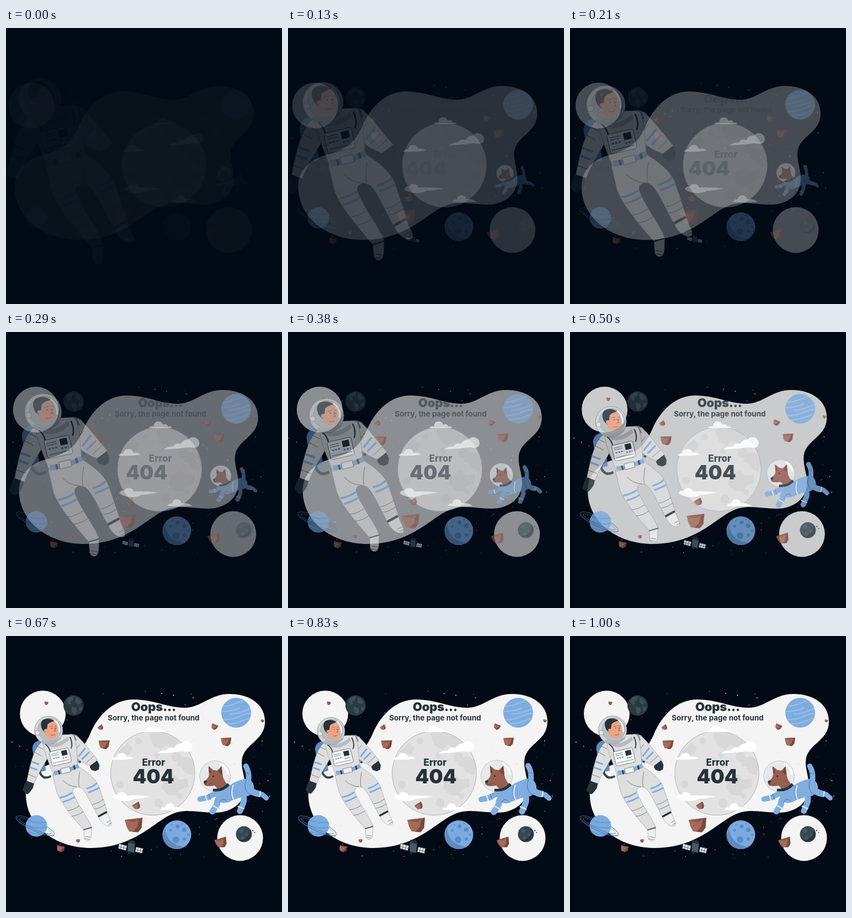
An HTML page that plays this animation: 500 px wide and 500 px high, repeating every 1.04 s.

```html
<!DOCTYPE html>
<html lang="en">
<head>
<meta charset="utf-8">
<title>Page not found</title>
<style>
  html, body { margin: 0; width: 100%; height: 100%; overflow: hidden; background: #020a15; }
  svg { display: block; width: 100%; height: 100%; --d: .53; --o: .03; }
  /* --d is the remaining travel, --o the shared opacity */
  .layer { opacity: var(--o); }
  .right { transform: translateX(calc(var(--d) * -40px)); }
  .left { transform: translateX(calc(var(--d) * 40px)); }
  .shrink { transform: scale(calc(1 + var(--d))); transform-origin: 110px 255px; }
  .grow { transform: scale(calc(1 - var(--d))); }
  .dog { transform-origin: 411px 275px; }
  .sat { transform-origin: 226px 382px; }
  text { font-family: Inter, "Open Sans", sans-serif; fill: #263238; text-anchor: middle; }
  .line { fill: none; stroke: #37474f; stroke-width: .6; stroke-linecap: round; }
  .suit { fill: #dedede; stroke: #78838a; stroke-width: .5; }
  .blue { fill: #7fade0; }
  .band { fill: none; stroke: #7fade0; stroke-width: 3; }
  .dark { fill: #263238; }
  .fur { fill: #985e50; }
  .limb { fill: none; stroke: #7fade0; stroke-linecap: round; stroke-linejoin: round; }
</style>
</head>
<body>
<svg viewBox="0 0 500 500">
  <defs>
    <clipPath id="moonClip"><circle cx="265" cy="248.500" r="76.500"/></clipPath>
    <clipPath id="blueClip"><circle cx="309.500" cy="360" r="26"/></clipPath>
    <clipPath id="bandClip"><circle cx="417" cy="139" r="27"/></clipPath>
    <clipPath id="ringClip"><circle cx="55" cy="344" r="19.500"/></clipPath>
    <g id="rock">
      <path fill="#a56a5b" d="M-1-.55 1-.8 .9 .35 .5 .85-.5 .75-.8 .2Z"/>
      <path fill="#794a3f" d="M1-.8 .9 .35 .5 .85-.1 .8 .4 .25 .6-.6Z"/>
      <path fill="#8a5649" d="M-1-.55 1-.8 .6-.6 .1-.3-.4-.4Z"/>
    </g>
  </defs>

  <g class="layer right" fill="#f4f4f4">
    <path d="M37 292C35 258 58 238 88 230C125 220 140 207 153 178C168 142 196 115 232 115C268 115 294 130 324 130C355 130 370 105 406 105C440 105 470 122 470 155C470 192 428 195 428 229C428 246 435 258 434 276C432 308 402 320 380 320C352 320 335 314 312 319C274 328 240 384 155 384C90 384 40 345 37 292Z"/>
    <circle cx="67.500" cy="140.500" r="41.500"/>
    <circle cx="425" cy="366" r="41.500"/>
  </g>
  <g id="stars" class="layer right" fill="#d9dde0"></g>

  <g class="layer">
    <circle cx="122.500" cy="126" r="18.500" fill="#2b3941"/>
    <path fill="#3f4e57" d="M109 117c4-6 9-8 14-8l-1 6-6 3 2 5-5 2zM126 112c5 0 9 4 11 9l-6 3-5-4zM119 128l8 2 2 6-5 7-4-5zM133 128l6 1-3 7-4-2z"/>
    <circle cx="431" cy="359" r="14.500" fill="#37474f"/>
    <g fill="#46565f"><circle cx="426" cy="353" r="4"/><circle cx="437" cy="360" r="3"/><circle cx="429" cy="366" r="3.500"/></g>
    <path fill="#263238" d="M441 349a14.500 14.500 0 0 1-19 21c12 0 21-9 19-21z"/>
    <g fill="#37474f"><circle cx="447" cy="352.500" r="1.200"/><circle cx="450.500" cy="356" r="1"/></g>

    <circle cx="417" cy="139" r="27" fill="#7eacdf"/>
    <g clip-path="url(#bandClip)" fill="none" stroke="#98beea" stroke-width="2.200" transform="rotate(-8 417 139)">
      <path d="M390 124q18 2 34-3t24 0M387 133q22 3 38-2M404 140q20 2 42-6M389 148q20 3 35-2t24 0M398 157q18 2 40-5"/>
    </g>

    <g transform="rotate(25 53 344)" fill="none" stroke="#557fae">
      <ellipse cx="53" cy="344" rx="38" ry="9" stroke-width=".9"/>
      <ellipse cx="53" cy="344" rx="32" ry="6" stroke-width=".6"/>
    </g>
    <circle cx="55" cy="344" r="19.500" fill="#7aabe0"/>
    <g clip-path="url(#ringClip)" fill="none" stroke="#6a9bd3" stroke-width="2.500">
      <path d="M36 332q16 9 38 5M34 341q20 10 42 5M38 354q16 8 34 3"/>
    </g>
    <g transform="rotate(25 53 344)" fill="none">
      <path d="M15 344a38 9 0 0 0 76 0" stroke="#46719f" stroke-width="1"/>
      <path d="M21 344a32 6 0 0 0 64 0" stroke="#46719f" stroke-width=".7"/>
    </g>

    <circle cx="309.500" cy="360" r="26" fill="#7baae0"/>
    <g clip-path="url(#blueClip)" fill="#5e8cc0">
      <path d="M290 339c-6 20 8 43 38 43l-16 10-32-14z"/>
      <circle cx="308" cy="369" r="6"/><circle cx="323" cy="351" r="4"/><circle cx="311" cy="345" r="3.500"/>
      <circle cx="323" cy="368" r="3"/><circle cx="298" cy="352" r="2.500"/><circle cx="319" cy="340" r="1.500"/>
      <circle cx="330" cy="360" r="2"/><circle cx="301" cy="342" r="1.500"/>
    </g>
  </g>

  <g class="layer left">
    <circle cx="265" cy="248.500" r="76.500" fill="#e2e2e2"/>
    <g clip-path="url(#moonClip)" fill="#d8d8d8">
      <path d="M258 176c18-6 45 3 57 18l-12 8-14-5-9 9-14-7-5-12zM314 222c10-8 22-1 28 9l-5 22-14-6-5-9-10-3zM285 261l17-10 11 9 15-2 1 15-16 6-3 10-17-1-12-12zM202 209l18-15 9 8-5 12-16 7z"/>
      <circle cx="308" cy="219" r="9"/><circle cx="272" cy="216" r="5"/><circle cx="239" cy="190" r="6"/>
      <circle cx="206" cy="269" r="7"/><circle cx="314" cy="290" r="5"/><circle cx="276" cy="303" r="8"/>
    </g>
    <circle cx="265" cy="248.500" r="76.200" fill="none" stroke="#8b9195" stroke-width=".6"/>
  </g>
  <g class="layer left" fill="#fff">
    <path d="M245 174q3-4 9-3q1-9 8-9q7-1 9 6q7-3 9 3q6-1 7 3z"/>
    <path d="M272 213q8-6 18-6q5-7 13-4q5-9 14-8q4-6 12-4q8 3 8 11q-1 8-10 8q-10-2-18 0q-18 2-37 3z"/>
    <path d="M190 224q3-5 9-4q2-9 10-8q7 0 8 7q9-2 14 3q-18 3-41 2z"/>
    <path d="M192 292q4-7 9-4q3-7 10-5q6 1 7 6q23-1 45 2q-16 3-31 4q-9 5-22 4q-13-2-18-7z"/>
    <path d="M279 315q3-5 8-4q3-9 10-8q7 1 7 7q10-1 21 5q-20 2-46 0z"/>
  </g>

  <g class="layer left">
    <text x="266.500" y="136" font-size="22" font-weight="900" letter-spacing="-.2">Oops...</text>
    <text x="266.500" y="153" font-size="13.400" font-weight="700">Sorry, the page not found</text>
    <text x="266.500" y="235" font-size="17" font-weight="800">Error</text>
  </g>
  <g class="layer right">
    <text x="268" y="267" font-size="35.500" font-weight="900">404</text>
  </g>

  <g id="rocks" class="layer right"></g>

  <g class="layer"><g class="grow sat">
    <path class="line" stroke="#90a4ae" d="M205 380l41 9M229 372l2-6"/>
    <path fill="#455a64" d="M221 374l13 2-2 17-12-3z"/>
    <path fill="#263238" d="M222 369l11 2 1 6-13-3zM219 390l8 2-4 4z"/>
    <g fill="#f1f3f4" stroke="#37474f" stroke-width=".8">
      <path d="M204 376l15 4-2 9-14-4zM236 382l13 3-2 9-13-3z"/>
      <path fill="none" d="M209 377l-2 10M214 379l-2 9M203 381l15 4M240 383l-2 9M245 384l-2 9M235 387l13 3"/>
    </g>
  </g></g>

  <g class="layer"><g class="grow dog">
    <g class="limb">
      <path stroke-width="10" d="M439 268Q443 248 435 235"/>
      <path stroke-width="12" d="M438 274Q448 285 458 286"/>
      <path stroke-width="9" d="M455 287L465 287 473 294"/>
      <path stroke-width="11" d="M428 282Q434 295 430 304L424 318"/>
      <path stroke-width="10" d="M395 285Q376 284 365 293L350 296"/>
      <path stroke-width="11" d="M394 288Q380 295 382 305L373 319"/>
    </g>
    <path class="blue" d="M380 280Q390 270 406 270Q421 260 437 258Q452 262 450 280Q444 292 428 292Q413 296 402 302Q388 306 380 296Z"/>
    <path class="line" d="M408 272Q407 288 410 297M436 260Q428 276 442 288M386 302Q392 292 399 299M430 246l12 3M461 281l-2 10M420 309l11 4M366 287l4 10M374 308l12 5"/>
    <g fill="none" stroke="#d9e9fa" stroke-width="2.500">
      <path d="M412 270Q406 283 412 297M360 289l3 10M374 308l11 6M462 281l-2 11M420 309l12 5"/>
    </g>
    <circle cx="378" cy="253.500" r="28.500" fill="#e6e9eb" stroke="#a9b3b8" stroke-width=".7"/>
    <path class="fur" d="M367 249L366 235L375 242L382 243L390 235L392 252Q394 264 405 272L386 280L377 271Q369 273 360 271Q355 267 359 262Q367 257 367 249Z"/>
    <path fill="#71443b" d="M390 235L392 252L384 246ZM366 235L371 246L367 249Z"/>
    <path class="dark" d="M357 263q4-3 6 0l-2 4q-4 0-4-4zM373 253q2-2 3 0t-2 2z"/>
    <path class="line" d="M362 269q7 1 12-4"/>
    <path fill="none" stroke="#263238" stroke-width="5" d="M374 279Q393 281 403 268"/>
    <path fill="none" stroke="#fff" stroke-width="4" stroke-linecap="round" d="M389 231Q400 237 402 249"/>
  </g></g>

  <g class="layer"><g class="shrink">
    <path fill="#5d8dc3" d="M66 190Q50 191 49 205L55 239Q60 249 73 244ZM121 181q10-2 11 7l-3 10zM124 206l6-2 4 14-4 12z"/>
    <path fill="none" stroke="#37474f" stroke-width="4" d="M69 232Q57 246 67 254Q72 259 82 254"/>
    <path fill="none" stroke="#37474f" stroke-width="4" d="M128 209q9 2 7 17l-3 4"/>

    <path class="suit" d="M70 191C54 198 47 224 39 263L52 268C60 246 72 232 80 214Z"/>
    <path class="band" d="M47 228l14 5M44 238l14 5"/>
    <path class="line" d="M42 251l13 5M52 211l13 7M58 201l10 5"/>
    <path class="dark" d="M38 262l14 5-2 8-5 7-4 4-5-2-4-5 2-7z"/>

    <path class="suit" d="M113 180C129 176 137 192 165 225L153 236C139 232 127 223 116 211Z"/>
    <path fill="#80888d" d="M113 183l10-4 5 11-11 5z"/>
    <path class="band" d="M137 224l13-13M131 219l12-15"/>
    <path class="line" d="M145 230l13-12M124 209l9-11"/>
    <path class="dark" d="M152 235l12-9 4 8-1 8-6 3-7-2-3-5z"/>

    <path class="suit" d="M85 251L131 237C149 248 163 260 168 275L182 317L166 326C154 305 147 286 137 276C128 270 119 274 121 283C131 308 147 326 154 344L140 349C120 326 98 300 92 281Z"/>
    <path class="suit" style="fill:#efefef" d="M140 348L154 345C153 355 155 361 151 367C147 371 141 367 141 362ZM166 325L182 318C184 327 191 334 189 341C183 346 170 338 166 325Z"/>
    <path fill="none" stroke="#263238" stroke-width="3.500" stroke-linecap="round" d="M167 325l13-7"/>
    <path class="line" style="stroke-width:1.500" d="M140 349l14-4"/>
    <path class="band" d="M98 292Q110 290 120 283M103 300Q114 297 124 291M145 276Q157 273 164 266M148 283Q160 279 168 274"/>
    <path class="line" d="M112 315q10-1 20-8M119 325q11-1 20-8M156 304q9-1 19-9M160 312q9-1 18-8M104 262q9 10 24 11M133 247q-3 14-1 26M143 361l8 1M142 365l8 1M181 336l6-3M184 340l5-3"/>

    <path class="suit" d="M67 190C85 182 105 178 122 181C130 200 127 220 131 239L87 253C79 231 70 215 67 190Z"/>
    <path fill="#b7bbbe" d="M76 195Q93 200 112 184L114 190Q95 207 78 201Z"/>
    <path class="band" style="stroke-width:7" d="M87 248Q111 246 131 235"/>
    <path fill="#f0f0f0" stroke="#37474f" stroke-width=".6" d="M99 241l16-4 2 9-16 4z"/>
    <path fill="#37474f" d="M94 244l3-1 2 7-3 1zM121 236l3-2 2 7-3 2z"/>
    <path class="line" style="stroke-width:2" d="M72 197Q79 202 81 212M116 185Q121 196 118 204"/>
    <g transform="rotate(-13 98 219)">
      <rect x="81" y="207" width="35" height="26" rx="3" fill="#fafafa" stroke="#455a64" stroke-width=".7"/>
      <rect x="102" y="210" width="10" height="9" class="dark"/>
      <path fill="none" stroke="#5f8fc5" stroke-width="2" stroke-dasharray="3 1.500" d="M85 220h13M102 223h10"/>
      <path class="line" d="M84 212h13M84 215h13M84 228h29"/>
    </g>

    <circle cx="78" cy="172.500" r="25" fill="#d3d6d8" stroke="#78838a" stroke-width=".7"/>
    <circle cx="79.500" cy="171.500" r="20.500" fill="#b9bfc3" stroke="#78838a" stroke-width=".5"/>
    <path fill="#f0a382" d="M70 164Q76 154 87 155Q93 162 94 172Q95 181 90 185Q81 189 73 183Z"/>
    <path class="dark" d="M72 177L67 172Q61 160 68 154Q78 149 88 156Q80 158 76 162L75 170Z"/>
    <circle cx="73" cy="173" r="3" fill="#f0a382"/>
    <path class="line" d="M80 166l5-1M89 165l3 0M88 168l3 6-3 0M82 181q4 1 7-1"/>
    <circle cx="83.500" cy="169" r=".8" class="dark"/><circle cx="90.500" cy="169" r=".8" class="dark"/>
    <path fill="none" stroke="#fff" stroke-width="2.500" stroke-linecap="round" d="M89 155Q98 163 97 175"/>
    <path fill="none" stroke="#aeb4b8" stroke-width="4" d="M65 191Q82 201 99 186"/>
    <circle cx="58" cy="177" r="4" fill="#e5e5e5" stroke="#78838a" stroke-width=".6"/>
  </g></g>
</svg>
<script>
const svg = document.querySelector('svg');
const NS = 'http://www.w3.org/2000/svg';

function add(parent, tag, attrs) {
  const el = document.createElementNS(NS, tag);
  for (const k in attrs) el.setAttribute(k, attrs[k]);
  document.getElementById(parent).append(el);
}

// x, y, half width, tilt
const rocks = [
  [172, 166, 5, -30], [178, 196, 10, 5], [73.5, 121.5, 3.5, 20], [378, 164, 6, 30],
  [399, 191, 9.5, 5], [465, 153.500, 3, 20], [237, 308, 7, -25], [232, 342, 16, 0],
  [390, 374, 11, -10], [99, 385, 7, 20], [131, 371, 3.5, 0]
];
for (const [x, y, r, a] of rocks)
  add('rocks', 'use', { href: '#rock', transform: `translate(${x} ${y}) rotate(${a}) scale(${r})` });

let seed = 11;
const rand = () => (seed = seed * 16807 % 2147483647) / 2147483647;
for (let i = 0; i < 230; i++) {
  const x = 18 + rand() * 465, y = 100 + rand() * 305, r = .4 + rand() * rand() * .7;
  if (((x - 250) / 245) ** 2 + ((y - 255) / 165) ** 2 < 1) add('stars', 'circle', { cx: x, cy: y, r });
}
for (const [x, y] of [[283, 104], [340, 112], [12, 192], [465, 190]])
  add('stars', 'circle', { cx: x, cy: y, r: .9 });

// Remaining travel: speeds up, settles at 830 ms, then drifts back a little
function travel(t) {
  if (t < 500) {
    const u = t / 500;
    return .53 - .41 * (.58 * u + .42 * u * u);
  }
  if (t < 830) {
    const v = (t - 500) / 330;
    return .12 * (1 - 2.55 * v * (1 - v) ** 2 - v * v * (3 - 2 * v));
  }
  return .025 * ((t - 830) / 170) ** 2;
}

const start = performance.now();
function draw() {
  const t = (performance.now() - start) % 1040;
  const step = Math.min(24, Math.floor(t * .024 + .1)); // 24 pictures a second
  const d = travel(step / .024);
  svg.style.setProperty('--d', d);
  svg.style.setProperty('--o', Math.min(1, 1.06 - 1.95 * d));
  requestAnimationFrame(draw);
}
draw();
</script>
</body>
</html>
```
